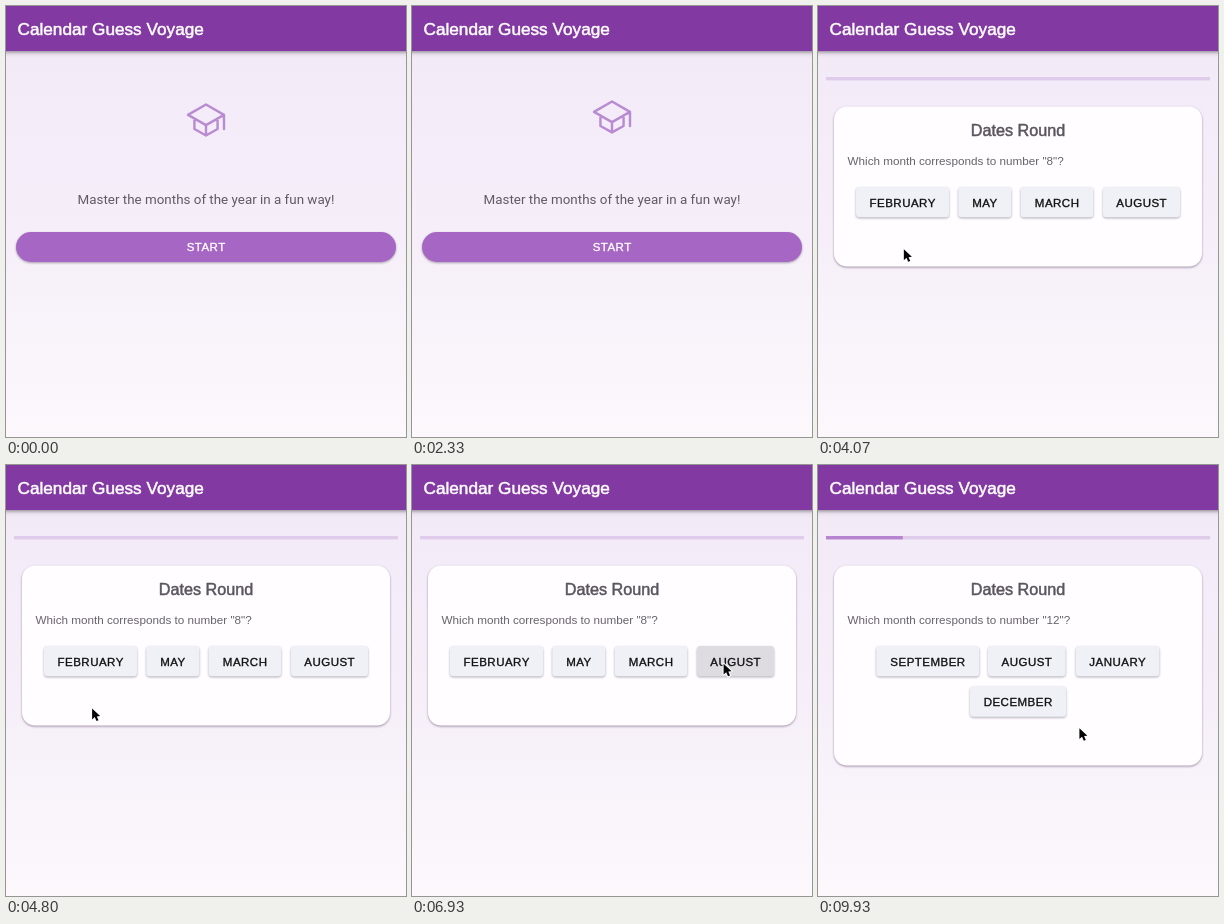
An HTML page that plays this animation: 400x431 px, repeating every 10 s.

```html
<!DOCTYPE html>
<html lang="en">
<head>
<meta charset="utf-8">
<title>Calendar Guess Voyage</title>
<style>
html, body { margin: 0; width: 100%; height: 100%; overflow: hidden; background: #f6effa; }
svg { display: block; width: 100vw; height: 100vh; }
text { font-family: "Liberation Sans", Arial, sans-serif; }
.mid { text-anchor: middle; }
.medium { stroke-width: .03em; stroke-linejoin: round; paint-order: stroke; }
.intro { font: 13.4px Roboto, sans-serif; }
.label { font-size: 11.5px; letter-spacing: .48px; }
.pill { filter: drop-shadow(0 1.3px 1.2px rgba(20, 5, 30, .36)); }
.card { filter: drop-shadow(0 1px 1.2px rgba(50, 25, 60, .45)); }
.key { filter: drop-shadow(0 1.1px 1px rgba(30, 25, 50, .36)); }
.bar { filter: drop-shadow(0 1px 1.5px rgba(0, 0, 0, .28)) drop-shadow(0 2px 2.2px rgba(0, 0, 0, .18)); }
</style>
</head>
<body>
<svg id="stage" viewBox="0 0 400 431" preserveAspectRatio="none">
  <defs>
    <linearGradient id="sky" x2="0" y2="1">
      <stop offset=".1" stop-color="#f3eaf8"/>
      <stop offset=".55" stop-color="#f6eff9"/>
      <stop offset="1" stop-color="#fcf8fc"/>
    </linearGradient>
  </defs>
  <rect width="400" height="431" fill="url(#sky)"/>
</svg>
<script>
const LOOP = 10000, HOP = 2000;
const CLICK_START = 3740, CLICK_MONTH = 7200, CLICK_NEXT = 8950;
const PURPLE = [166, 102, 195], DARK = [141, 69, 170];
const KEY = [240, 241, 247], KEY_HOVER = [222, 220, 225], KEY_OFF = [248, 249, 252];
const stage = document.getElementById('stage');

function el(parent, tag, attrs, words) {
  const node = document.createElementNS('http://www.w3.org/2000/svg', tag);
  for (const name in attrs) node.setAttribute(name, attrs[name]);
  if (words) node.textContent = words;
  parent.append(node);
  return node;
}
const group = parent => el(parent, 'g', {});
const show = (node, on) => node.setAttribute('display', on ? 'inline' : 'none');
const clamp = x => Math.max(0, Math.min(1, x));
const ease = x => x * x * (3 - 2 * x);
const ramp = (t, start, span) => ease(clamp((t - start) / span));
const mix = (a, b, k) => `rgb(${a.map((v, i) => Math.round(v + (b[i] - v) * k))})`;

function medium(parent, x, y, size, color, words, cls = '') {
  return el(parent, 'text', {
    x, y, fill: color, stroke: color, 'font-size': size, class: 'medium ' + cls
  }, words);
}

function pill(parent, x, y, w, words) {
  const box = el(parent, 'rect', { x, y, width: w, height: 30, rx: 15, class: 'pill' });
  medium(parent, 200.2, y + 19.2, 11.5, '#fff', words, 'label mid');
  return box;
}

function key(parent, x, y, w, words) {
  const box = el(parent, 'rect', { x, y, width: w, height: 30.3, rx: 3.5, fill: mix(KEY, KEY, 0), class: 'key' });
  const text = medium(parent, x + w / 2 + .2, y + 19.7, 11.5, '#111', words, 'label mid');
  return { box, text };
}

function question(parent, number) {
  const card = el(parent, 'rect', { x: 16, y: 100.5, width: 368, height: 160, rx: 13, fill: '#fffdff', class: 'card' });
  medium(parent, 200, 129.7, 16.2, '#59545d', 'Dates Round', 'mid');
  el(parent, 'text', { x: 29.5, y: 159, 'font-size': 11.7, fill: '#67626a' },
    `Which month corresponds to number "${number}"?`);
  return card;
}

// Home
const home = group(stage);
const cap = el(home, 'path', {
  d: 'M-224 -64 0 -192 224 -64 0 64zM-144 -16V112L0 192 144 112V-16M0 64V192M224 -64V112',
  fill: 'none', stroke: '#b98bd1', 'stroke-width': 30, 'stroke-linejoin': 'round', 'stroke-linecap': 'round'
});
el(home, 'text', { x: 200, y: 197.8, fill: '#5f5a63', class: 'intro mid' },
  'Master the months of the year in a fun way!');
const start = pill(home, 10, 226, 380, 'START');

// Quiz
const quiz = group(stage);
el(quiz, 'rect', { x: 8, y: 71, width: 384, height: 3.4, fill: '#dfcbea' });
const progress = el(quiz, 'rect', { x: 8, y: 71, height: 3.4, fill: '#b684d0' });

const first = group(quiz);
const firstCard = question(first, 8);
const months = [
  [38, 93, 'FEBRUARY'], [140.3, 53, 'MAY'], [202.7, 72.5, 'MARCH'], [285, 77, 'AUGUST']
].map(([x, w, name]) => key(first, x, 181, w, name));
const result = group(first);
el(result, 'text', {
  x: 200, y: 243.5, fill: '#237a1c', 'font-size': 11.5, 'font-weight': 700, class: 'mid'
}, 'Correct! Great job!');
const next = pill(result, 31, 253, 338, 'NEXT');

const second = group(quiz);
question(second, 12).setAttribute('height', 200);
key(second, 58.3, 181, 103, 'SEPTEMBER');
key(second, 170, 181, 77.5, 'AUGUST');
key(second, 257.8, 181, 83.5, 'JANUARY');
key(second, 152, 221.5, 96, 'DECEMBER');

// Header
el(stage, 'rect', { x: -6, y: -6, width: 412, height: 51, fill: '#8339a2', class: 'bar' });
medium(stage, 11.5, 28.8, 17.2, '#fff', 'Calendar Guess Voyage');

const pointer = el(stage, 'path', {
  d: 'M0 0V10.8L2.6 8.5 4.4 12.5 6.4 11.7 4.7 7.8 8 7.5z',
  fill: '#050505', stroke: '#fff', 'stroke-width': 2, 'stroke-linejoin': 'round', 'paint-order': 'stroke'
});

// time, x, y
const path = [
  [2480, 371, 397], [3180, 86.8, 240.5], [3800, 85.8, 243.3], [5250, 86.2, 243.7], [6400, 196, 226],
  [6820, 311.6, 198.8], [7560, 311.6, 198.8], [8150, 281.8, 270.8], [9640, 281.8, 270.8], [9930, 261.4, 263.2]
];

function pointerAt(t) {
  let i = 0;
  while (i < path.length - 2 && t >= path[i + 1][0]) i++;
  const [t0, x0, y0] = path[i], [t1, x1, y1] = path[i + 1];
  const k = ramp(t, t0, t1 - t0);
  return [x0 + (x1 - x0) * k, y0 + (y1 - y0) * k];
}

function draw(t) {
  show(home, t < CLICK_START);
  show(quiz, t >= CLICK_START);
  show(first, t < CLICK_NEXT);
  show(second, t >= CLICK_NEXT);
  show(result, t >= CLICK_MONTH);
  show(pointer, t >= path[0][0]);

  const hop = 113.6 + 3.3 * Math.cos(2 * Math.PI * (t / HOP - .77));
  cap.setAttribute('transform', `translate(200 ${hop.toFixed(2)}) scale(.0804)`);
  start.setAttribute('fill', mix(PURPLE, DARK, ramp(t, 3230, 250)));
  next.setAttribute('fill', mix(PURPLE, DARK, ramp(t, 8020, 250)));

  const off = ramp(t, CLICK_MONTH, 200);
  const hover = ramp(t, 6700, 160) * (1 - off);
  firstCard.setAttribute('height', t < CLICK_MONTH ? 160 : 196);
  months.forEach(({ box, text }, i) => {
    box.setAttribute('fill', off ? mix(KEY, KEY_OFF, off) : mix(KEY, KEY_HOVER, i === 3 ? hover : 0));
    box.style.filter = `drop-shadow(0 1.1px 1px rgba(30,25,50,${.36 - .24 * off}))`;
    const ink = mix([17, 17, 17], [136, 135, 139], off);
    text.setAttribute('fill', ink);
    text.setAttribute('stroke', ink);
  });

  progress.setAttribute('width', 76.8 * clamp((t - CLICK_NEXT) / 300));
  const [x, y] = pointerAt(t);
  pointer.setAttribute('transform', `translate(${x.toFixed(2)} ${y.toFixed(2)})`);
}

const begin = performance.now();
function tick() {
  draw((performance.now() - begin) % LOOP);
  requestAnimationFrame(tick);
}
draw(0);
requestAnimationFrame(tick);
</script>
</body>
</html>
```
